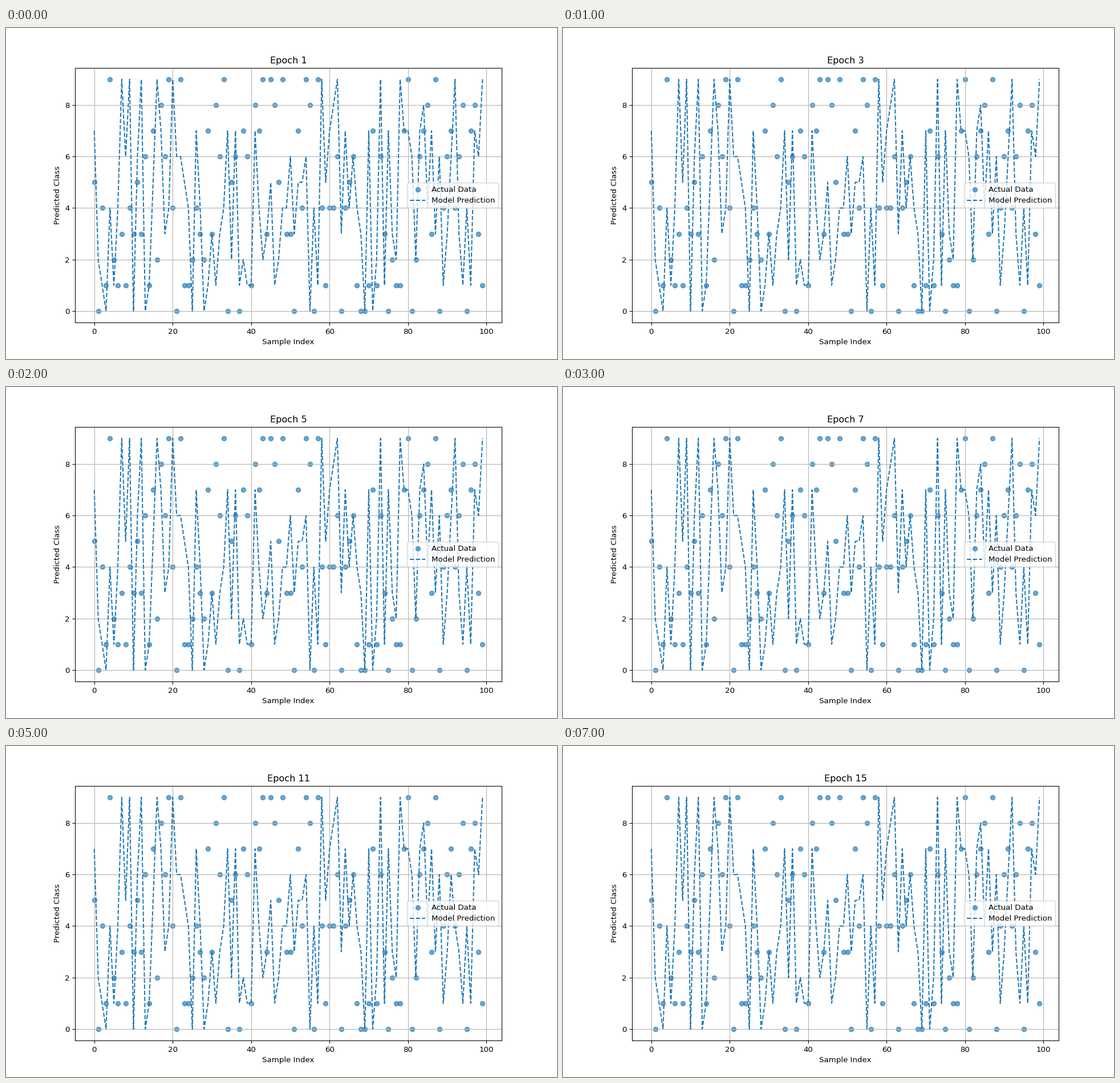
Recreate the animation shown at these times as a matplotlib script. Size 966x580 px, loop 7.5 s.

```python
import numpy as np
import matplotlib.pyplot as plt
from matplotlib.animation import FuncAnimation

WIDTH, HEIGHT, DPI = 966, 580, 96.6
EPOCHS, STEP_MS = 15, 500

plt.rcParams["font.family"] = "DejaVu Sans"

actual = np.array([
    5, 0, 4, 1, 9, 2, 1, 3, 1, 4, 3, 5, 3, 6, 1, 7, 2, 8, 6, 9,
    4, 0, 9, 1, 1, 2, 4, 3, 2, 7, 3, 8, 6, 9, 0, 5, 6, 0, 7, 6,
    1, 8, 7, 9, 3, 9, 8, 5, 9, 3, 3, 0, 7, 4, 9, 8, 0, 9, 4, 1,
    4, 4, 6, 0, 4, 5, 6, 1, 0, 0, 1, 7, 1, 6, 3, 0, 2, 1, 1, 7,
    9, 0, 2, 6, 7, 8, 3, 9, 0, 4, 6, 7, 4, 6, 8, 0, 7, 8, 3, 1,
])
settled = np.array([
    7, 2, 1, 0, 4, 1, 4, 9, 5, 9, 0, 6, 9, 0, 1, 5, 9, 7, 3, 4,
    9, 6, 6, 5, 4, 0, 7, 4, 0, 1, 3, 1, 3, 4, 7, 2, 7, 1, 2, 1,
    1, 7, 4, 2, 3, 5, 1, 2, 4, 4, 6, 3, 5, 5, 6, 0, 4, 1, 9, 5,
    7, 8, 9, 3, 7, 4, 6, 4, 3, 0, 7, 0, 2, 9, 1, 7, 3, 2, 9, 7,
    7, 6, 2, 7, 8, 4, 7, 3, 6, 1, 3, 6, 9, 3, 1, 4, 1, 7, 6, 9,
])

# Samples the model gets differently in some epochs: {epoch: {sample: class}}
deviations = {1: {8: 6}, 2: {8: 6}, 4: {8: 6, 38: 3}, 11: {92: 4}}


def predict(epoch):
    classes = settled.copy()
    for sample, value in deviations.get(epoch, {}).items():
        classes[sample] = value
    return classes


# The tiny margin keeps the pixel size from rounding down.
fig, ax = plt.subplots(figsize=(WIDTH / DPI + 1e-9, HEIGHT / DPI + 1e-9), dpi=DPI)
index = np.arange(len(actual))
ax.scatter(index, actual, alpha=0.65, label="Actual Data")
line, = ax.plot(index, predict(1), "--", label="Model Prediction")
ax.set_xlabel("Sample Index")
ax.set_ylabel("Predicted Class")
title = ax.set_title("Epoch 1")
ax.legend(loc="center right")
ax.grid(True)


def update(frame):
    epoch = frame + 1
    line.set_ydata(predict(epoch))
    title.set_text(f"Epoch {epoch}")
    return line, title


anim = FuncAnimation(fig, update, frames=EPOCHS, interval=STEP_MS,
                     repeat=True, repeat_delay=0, blit=False)
plt.show()
```
